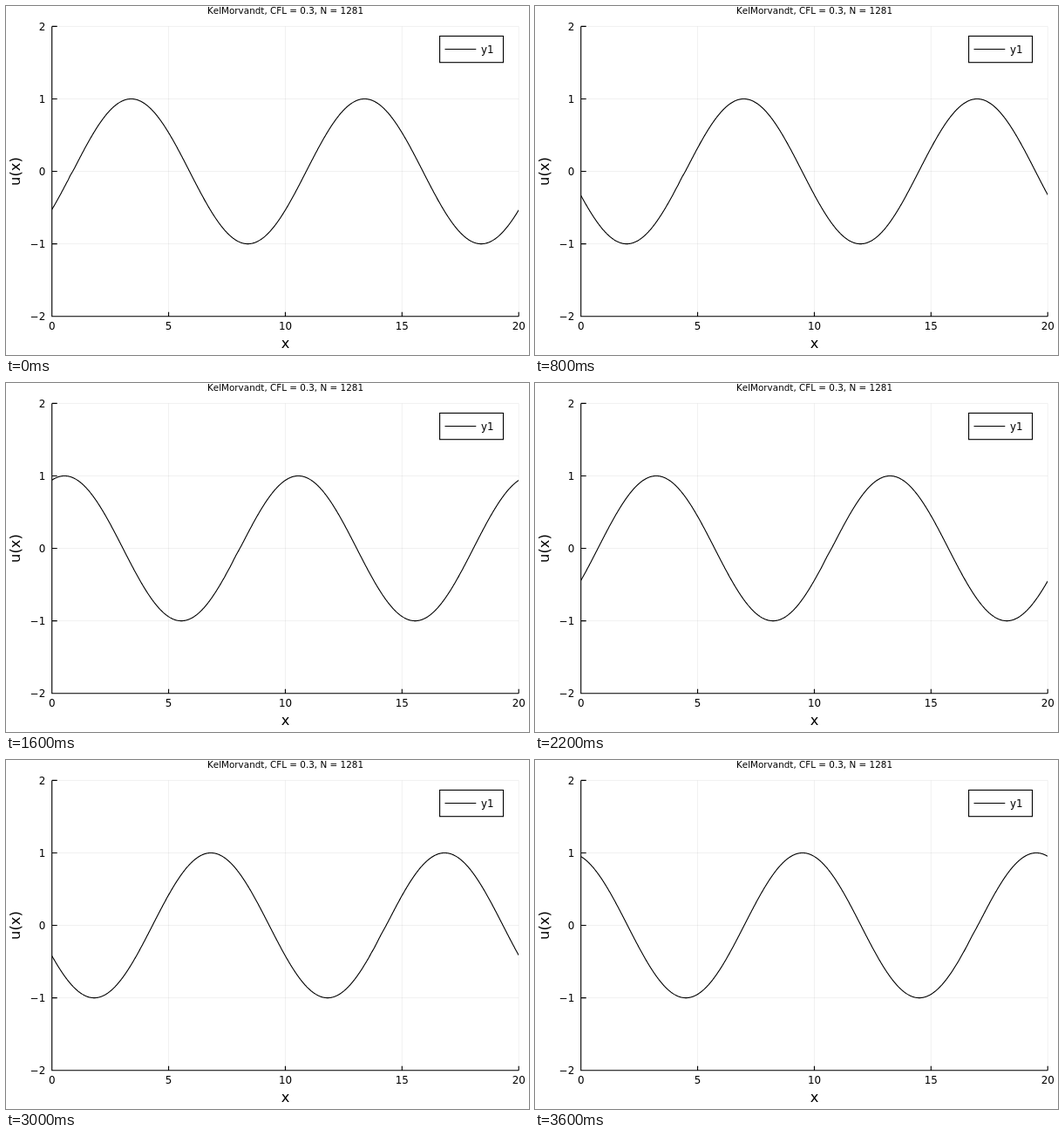
Recreate the animation shown at these times as an HTML page. Size 600 by 400 pixels, loop 3.8 s.

```html
<!DOCTYPE html>
<html lang="en">
<head>
<meta charset="utf-8">
<title>Travelling wave</title>
<style>
  html, body { margin: 0; width: 100%; height: 100%; overflow: hidden; background: #fff; }
  svg { display: block; }
  text { font-family: "DejaVu Sans", sans-serif; font-size: 11.9px; font-kerning: none; text-anchor: middle; }
  .label { font-size: 16.3px; }
  .end { text-anchor: end; }
  .start { text-anchor: start; }
  path, rect { fill: none; stroke: #000; stroke-width: 1.1; }
  #grid { stroke-width: 1; stroke-opacity: .06; }
</style>
</head>
<body>
<svg width="600" height="400" viewBox="0 0 600 400">
  <clipPath id="plot"><rect x="52.7" y="23.4" width="535.5" height="332.3"/></clipPath>
  <path id="grid"/>
  <path id="axes"/>
  <path id="curve" clip-path="url(#plot)" stroke-linejoin="round"/>
  <g id="ticks"></g>
  <text class="end" x="410" y="9.3" style="font-size:10.4px">KelMorvandt, CFL = 0.3, N = 1281</text>
  <text class="label" x="320.5" y="391.5">x</text>
  <text class="label" transform="translate(16.3 189.6) rotate(-90)">u(x)</text>
  <rect x="497.6" y="34.5" width="72.9" height="30.2"/>
  <path d="M503.5 49.5H539.3"/>
  <text class="start" x="545" y="54">y1</text>
</svg>
<script>
const FRAMES = 19, FRAME_MS = 200, STEPS = 191;
const N = 1281, CFL = 0.3, LENGTH = 20;
const LEFT = 52.7, RIGHT = 588.2, TOP = 23.4, BOTTOM = 355.7;
const px = x => LEFT + x / LENGTH * (RIGHT - LEFT);
const py = u => BOTTOM - (u + 2) / 4 * (BOTTOM - TOP);
const $ = id => document.getElementById(id);

function drawAxes() {
  let grid = "", axes = `M${LEFT} ${TOP}V${BOTTOM}H${RIGHT}`, labels = "";
  for (let x = 0; x <= 20; x += 5) {
    grid += `M${px(x)} ${TOP}V${BOTTOM}`;
    axes += `M${px(x)} ${BOTTOM}v-5`;
    labels += `<text x="${px(x)}" y="371.3">${x}</text>`;
  }
  for (let u = -2; u <= 2; u++) {
    grid += `M${LEFT} ${py(u)}H${RIGHT}`;
    axes += `M${LEFT} ${py(u)}h6`;
    labels += `<text class="end" x="45.3" y="${py(u) + 4.3}">${String(u).replace("-", "−")}</text>`;
  }
  $("grid").setAttribute("d", grid);
  $("axes").setAttribute("d", axes);
  $("ticks").innerHTML = labels;
}

// One second-order advection step; the ends of the grid wrap around.
function advance(u) {
  return u.map((v, i) => {
    const before = u[(i + N - 1) % N], after = u[(i + 1) % N];
    return v - CFL / 2 * (after - before) + CFL * CFL / 2 * (after - 2 * v + before);
  });
}

function solveCurves() {
  const dx = LENGTH / (N - 1);
  let u = Float64Array.from({ length: N }, (_, i) => Math.sin(2 * Math.PI * i * dx / 10));
  return Array.from({ length: FRAMES }, () => {
    for (let s = 0; s < STEPS; s++) u = advance(u);
    return "M" + Array.from(u, (v, i) => `${px(i * dx).toFixed(2)} ${py(v).toFixed(2)}`).join("L");
  });
}

drawAxes();
const curves = solveCurves();
const start = performance.now();
let shown = -1;

function render() {
  const frame = Math.floor((performance.now() - start) / FRAME_MS) % FRAMES;
  if (frame !== shown) $("curve").setAttribute("d", curves[shown = frame]);
  requestAnimationFrame(render);
}
render();
</script>
</body>
</html>
```
